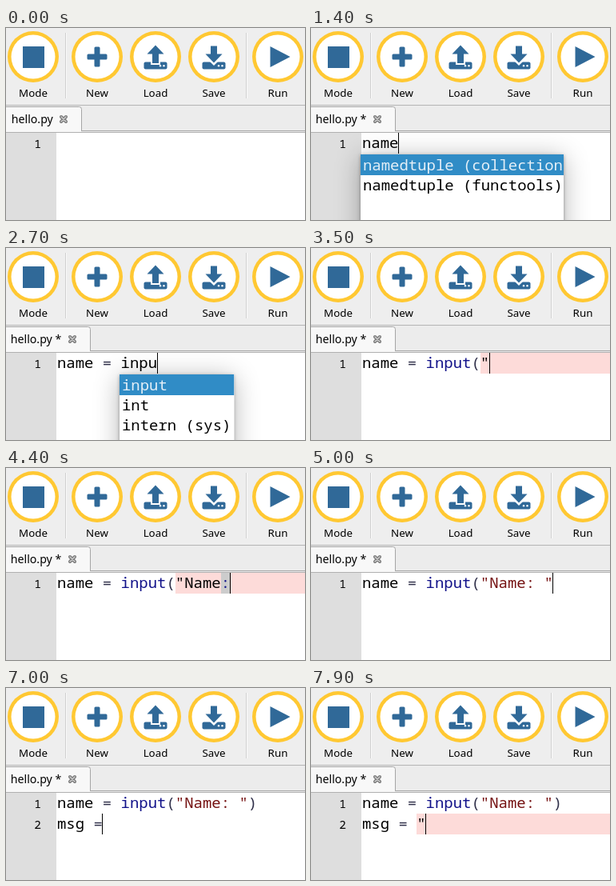
Animation of 374x240 px, one loop 8000 ms. Source, as an HTML page with a canvas:

```html
<!DOCTYPE html>
<html lang="en">
<head>
<meta charset="utf-8">
<title>Typing in a code editor</title>
<style>
  html, body { margin: 0; width: 100%; height: 100%; overflow: hidden; background: #fff; }
  canvas { display: block; }
</style>
</head>
<body>
<canvas id="stage" width="374" height="240"></canvas>
<script>
const W = 374, H = 240, LOOP = 8000;
const ctx = document.getElementById('stage').getContext('2d');

const CODE_FONT = '18.95px "Noto Sans Mono", monospace';
const CELL = 11.37, LEFT = 64, TOP = 131, LINE = 26;
const BLUE = '#306998', RING = '#ffc832';
const INK = { plain: '#000', operator: '#30304a', builtin: '#12128a', string: '#741010' };

const SCRIPT = 'name = input("Name: ")\nmsg = "';
const KEY_TIMES = [
  600, 800, 1000, 1200, 1600, 1800, 2000, 2300, 2500, 2600, 2700, 2800, 3000, 3300,
  3800, 4000, 4100, 4200, 4400, 4600, 4900, 5200, 5500,
  6200, 6400, 6600, 6800, 7000, 7200, 7600
];
const CARET_START = 100;
const COMPLETIONS = {
  na: ['namedtuple (collections)', 'namedtuple (functools)'],
  in: ['input', 'int', 'intern (sys)'],
  Na: ['NameError']
};

function rect(x, y, w, h, color) {
  ctx.fillStyle = color;
  ctx.fillRect(x, y, w, h);
}

function text(str, x, y, font, color = '#000', align = 'left') {
  ctx.font = font;
  ctx.textAlign = align;
  ctx.fillStyle = color;
  ctx.fillText(str, x, y);
}

function shape(path, color = BLUE) {
  ctx.fillStyle = color;
  ctx.fill(new Path2D(path));
}

function rounded(x, y, w, h, r, color = BLUE) {
  ctx.fillStyle = color;
  ctx.beginPath();
  ctx.roundRect(x, y, w, h, r);
  ctx.fill();
}

function dot(x, y, r, color) {
  ctx.fillStyle = color;
  ctx.beginPath();
  ctx.arc(x, y, r, 0, 7);
  ctx.fill();
}

function clipped(x, y, w, h, paint) {
  ctx.save();
  ctx.beginPath();
  ctx.rect(x, y, w, h);
  ctx.clip();
  paint();
  ctx.restore();
}

function tray(x) {
  rounded(x - 14.5, 42.5, 29, 9, 2);
  dot(x + 6, 47.3, 1.2, '#fff');
  dot(x + 10.5, 47.3, 1.2, '#fff');
}

const BUTTONS = [
  ['Mode', 34, () => rect(21, 23, 27, 27, BLUE)],
  ['New', 114, x => {
    rounded(x - 12.5, 32.5, 25, 7, 1.5);
    rounded(x - 3.5, 23.5, 7, 25, 1.5);
  }],
  ['Load', 187, x => {
    tray(x);
    rect(x - 6, 40, 12, 6, '#fff');
    shape(`M${x} 21.5l10.5 11h-6.5v11.5h-8v-11.5h-6.5z`);
  }],
  ['Save', 260, x => {
    tray(x);
    shape(`M${x - 13} 34h26l-13 13z`, '#fff');
    shape(`M${x} 43.5l-10.5-11h6.5v-10h8v10h6.5z`);
  }],
  ['Run', 340, () => shape('M330.5 23L355.5 36 330.5 49z')]
];

function drawToolbar() {
  rect(0, 0, W, 97, '#eeeeee');
  for (const x of [74, 300]) {
    rect(x, 6, 1, 82, '#d0d0d0');
    rect(x + 1, 6, 1, 82, '#fafafa');
  }
  for (const [label, x, icon] of BUTTONS) {
    dot(x, 36, 32, RING);
    dot(x, 36, 27.5, '#fff');
    icon(x);
    text(label, x, 86, '13.33px "Noto Sans", sans-serif', '#000', 'center');
  }
}

function drawTabs(modified) {
  const width = modified ? 105 : 94, cross = modified ? 83 : 72;
  rect(0, 96, W, 1, '#b4b4b4');
  rect(0, 97, W, 34, '#ececec');
  rect(width, 128, W, 1, '#a6a6a6');
  rect(0, 130, W, 1, '#b0b0b0');
  clipped(0, 97, W, 32, () => {
    rounded(-4.5, 98.5, width + 5, 36, 3, '#f8f8f8');
    ctx.lineWidth = 1;
    ctx.strokeStyle = '#a6a6a6';
    ctx.stroke();
  });
  rect(0, 129, width, 1, '#f8f8f8');
  text(modified ? 'hello.py *' : 'hello.py', modified ? 5.7 : 6.7, 119, '14.2px "Noto Sans", sans-serif');

  const stroke = new Path2D(`M${cross - 3} 111l6 6m0-6l-6 6`);
  ctx.lineCap = 'round';
  for (const [size, color] of [[4, '#777'], [1.5, '#ccc']]) {
    ctx.lineWidth = size;
    ctx.strokeStyle = color;
    ctx.stroke(stroke);
  }
}

function tokenColor(token) {
  if (token === 'input') return INK.builtin;
  if (/^".*"$/.test(token) && token.length > 1) return INK.string;
  return /^[()=]$/.test(token) ? INK.operator : INK.plain;
}

// Columns of the brace before the caret and of its partner.
function bracesAt(line) {
  const last = line.at(-1);
  if (!last || !'():'.includes(last)) return [];
  return last === ')' ? [line.indexOf('('), line.length - 1] : [line.length - 1];
}

function drawLine(line, row, active) {
  const y = TOP + row * LINE, baseline = y + 19;
  const columnX = column => LEFT + column * CELL;
  const braces = active ? bracesAt(line) : [];
  text(row + 1, 44, baseline, '14.5px "Noto Sans Mono", monospace', '#000', 'right');

  if (line.split('"').length === 2) {
    const x = Math.round(columnX(line.indexOf('"')));
    rect(x, y, W - x, LINE, '#fddbd9');
  }
  for (const c of braces) rect(Math.round(columnX(c)), y, 11, LINE, '#cccccc');

  for (const match of line.matchAll(/"[^"]*"?|\w+|\S/g)) {
    const color = tokenColor(match[0]);
    [...match[0]].forEach((char, i) => {
      const column = match.index + i;
      text(char, columnX(column), baseline, CODE_FONT, braces.includes(column) ? INK.builtin : color);
    });
  }
}

function drawCompletions(line) {
  const word = /\w{2,}$/.exec(line);
  const items = word && COMPLETIONS[word[0].slice(0, 2)];
  if (!items) return;
  const x = Math.round(62 + word.index * CELL), y = 158, height = 130;
  const longest = Math.max(...items.map(item => item.length));
  const width = Math.min(254, longest * CELL + 7);
  ctx.save();
  for (const [blur, alpha] of [[30, 0.3], [4, 0.35]]) {
    ctx.shadowColor = `rgba(0,0,0,${alpha})`;
    ctx.shadowBlur = blur;
    ctx.shadowOffsetY = blur / 8;
    rect(x, y, width, height, '#fff');
  }
  ctx.restore();
  clipped(x, y, width, height, () => {
    rect(x, y, width, 26, '#308cc6');
    items.forEach((item, i) =>
      text(item, x + 3, y + 20 + i * 25, CODE_FONT, i ? '#000' : '#e4eff7'));
  });
}

function draw(t) {
  const typed = KEY_TIMES.filter(time => time <= t).length;
  const lines = SCRIPT.slice(0, typed).split('\n');
  const row = lines.length - 1, current = lines[row];

  rect(0, 0, W, H, '#fff');
  drawToolbar();
  drawTabs(typed > 0);
  rect(0, TOP, 63, H - TOP, '#dedede');
  lines.forEach((line, i) => drawLine(line, i, i === row));

  const lastKey = typed ? KEY_TIMES[typed - 1] : CARET_START;
  if (t >= lastKey && (t - lastKey) % 1000 < 500) {
    rect(Math.round(LEFT + current.length * CELL - 0.4), TOP + row * LINE, 1, LINE, '#000');
  }
  drawCompletions(current);
}

function tick(now) {
  draw(now % LOOP);
  requestAnimationFrame(tick);
}
draw(0);
requestAnimationFrame(tick);
</script>
</body>
</html>
```
